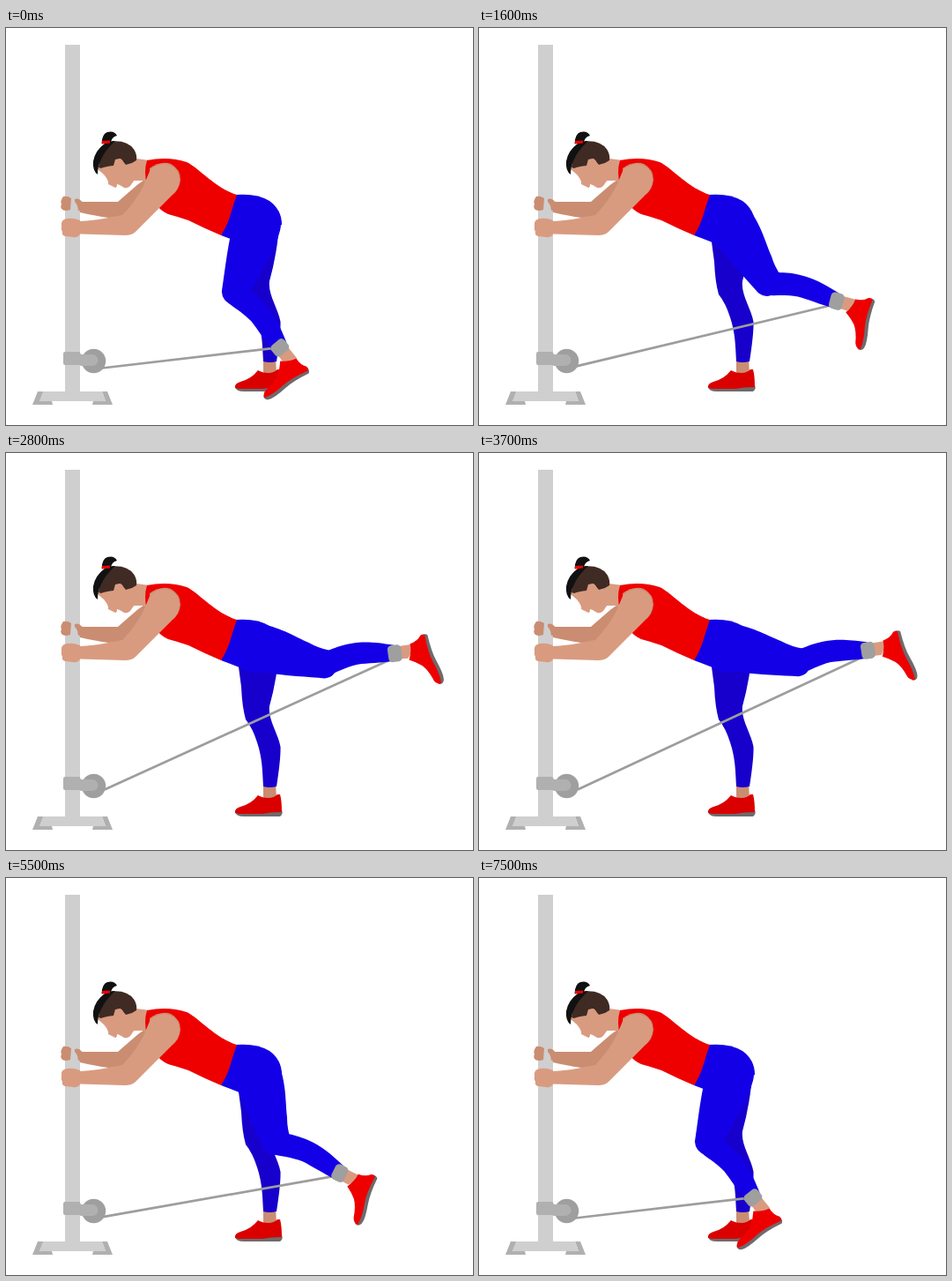
An HTML page for the animation above (7.6 s loop, 530x450 px).

```html
<!DOCTYPE html>
<html lang="en">
<head>
<meta charset="utf-8">
<title>Cable kickback</title>
<style>
  html, body { margin: 0; width: 100%; height: 100%; overflow: hidden; background: #fff; }
  svg { display: block; width: 530px; height: 450px; }
  .post { fill: #cfcfcf; }
  .steel { fill: #b0b0b0; }
  .grey { fill: #9f9f9f; }
  .skin { fill: #d99b80; }
  .shade { fill: #ca8d72; }
  .red { fill: #ee0000; }
  .dimred { fill: #da0000; }
  .blue { fill: #1400e6; }
  .dimblue { fill: #1700cc; }
  .sole { fill: #6e6a6c; }
  .hair { fill: #3f2b24; }
  .black { fill: #111; }
</style>
</head>
<body>
<svg viewBox="0 0 530 450">
  <!-- stand -->
  <path class="steel" d="M36 412H43L38 423H52L53 427H30ZM109 412H115L121 427H98L99 423H113Z"/>
  <path class="post" d="M67 19H84V412H109L113 423H38L42 412H67Z"/>
  <circle class="grey" cx="99.5" cy="377.5" r="13.7"/>
  <path class="steel" d="M67 367H83Q84 367 85 370H98A6.5 6.5 0 0 1 98 383H85L83 382H67Q65 382 65 380V369Q65 367 67 367Z"/>

  <!-- far arm -->
  <path class="shade" d="M160 170L150 177Q136 189 127 197L85 197Q82 203 84 209Q102 213 116 215L140 214L170 190Z"/>
  <path class="shade" d="M65 191Q70 190 74 193L73 206Q68 208 64 206Q61 203 63 200Q61 196 65 191ZM78 194Q83 192 87 198L86 206L82 207Q81 199 78 197Z"/>

  <!-- standing leg -->
  <path class="shade" d="M292 374H306L307 391L298 394L292 390Z"/>
  <path class="dimblue" d="M263 235L309 235Q306 262 299 287C297 302 309 318 311.500 333Q312 346 307 378Q299 380 292 378C291 360 291 346 285 328Q280 312 272 302Q268 288 267 265Z"/>
  <path class="sole" d="M260 407Q284 405 313 405Q315 409 311 412H270Q261 412 260 407Z"/>
  <path class="dimred" d="M260 408Q259 403 266 401Q278 398 286 388Q291 391 298 391Q304 391 308 387L311 387Q313 394 313 407Q300 407 291 409H265Z"/>

  <line id="cable" stroke="#9d9d9d" stroke-width="2.7"/>

  <!-- moving leg -->
  <g id="calf">
    <path class="skin" d="M-6 76H8V99H2L-7 92Z"/>
    <g id="shoe">
      <path class="sole" d="M21 -13Q26 -14 28 -11Q26 8 28 20Q31 37 29 43Q27 48 22 46Z"/>
      <path class="red" d="M6 -8Q15 -8 20 -13Q23 -14 25 -12Q22 8 24 20Q27 36 25 46Q20 46 18 40Q16 27 11 20Q6 14 -1 9Q5 1 6 -8Z"/>
    </g>
    <path class="blue" d="M14 2C16 10 18 18 18.500 30C19 46 16 58 10 78H-8C-8 60 -6 46 -6 34C-7 20 -12 9 -14 -3Q-4 -16 14 2Z"/>
    <rect class="grey" x="-9" y="70" width="19" height="15.5" rx="4.500"/>
  </g>
  <g id="thigh">
    <path class="blue" d="M29 0C29 26 22 42 19 58Q15 70 15 84Q13 92 0 94Q-13 96 -17 84C-19 65 -23 40 -24 17L-27 0A28 28 0 0 1 29 0Z"/>
  </g>
  <path class="blue" d="M260 189Q285 187 299 196Q313 206 313 223L270 245L244 235Z"/>

  <!-- torso and neck -->
  <path class="skin" d="M140 147L163 150L166 178L156 173L142 173Z"/>
  <path class="red" d="M160 150Q184 145 205 152C217 157 238 182 262 189Q258 200 254 214Q250 226 244 235Q225 227 207 218Q192 213 184 211Q177 208 172 202L160 178Q156 163 160 150Z"/>

  <!-- near arm -->
  <path class="shade" d="M163 159Q176 150 187 154Q198 160 198 172Q197 183 189 189L166 180Z"/>
  <path class="skin" d="M164 160Q177 151 187 156Q197 161 197 173Q196 182 188 190L147 231Q143 235 135 235L84 233.500V219Q100 218 111 216L132 212Q146 198 156 179Z"/>
  <path class="skin" d="M66 217Q74 214 84 218V234Q81 238 76 237L67 236Q63 235 64 231Q62 228 63 225Q62 219 66 217Z"/>

  <!-- head -->
  <path class="skin" d="M105 155L128 140L148 145V170Q144 174 141 179Q138 182 134 181L129 178L126 177Q126 181 124 181L116 177Q117 173 111 166L104 160Z"/>
  <path class="hair" d="M105 158Q106 142 120 128.500Q138 127 145.500 138Q149 144 148 150L143 153L136 155L130 148L124 149L122 156Q113 157 108 159Z"/>
  <path class="black" d="M104 166Q98 162 99 151Q101 139 112 131Q117 128 124 128Q112 139 108 149Q104 156 104 166Z"/>
  <path class="skin" d="M124 150Q130 146 133 151Q134 157 130 159Q126 158 124 150Z"/>
  <path class="black" d="M108.500 131Q109 120 115 118Q123 116 126 122Q120 123 118.500 131Z"/>
  <path class="red" d="M109 128L118 127.500L118 130.500L109 131.500Z"/>
</svg>
<script>
  const LOOP = 7600, STEP = 100;
  const HIP = [283, 222], THIGH = 83;

  // Monotone cubic curve through the given points
  function curve(xs, ys) {
    const last = xs.length - 1;
    const slope = i => (ys[i + 1] - ys[i]) / (xs[i + 1] - xs[i]);
    const tangent = xs.map((_, i) => {
      if (i === 0 || i === last) return 0;
      const a = slope(i - 1), b = slope(i);
      return a * b <= 0 ? 0 : 2 * a * b / (a + b);
    });
    return x => {
      let i = 0;
      while (i < last - 1 && x > xs[i + 1]) i++;
      const h = xs[i + 1] - xs[i];
      const s = Math.min(1, Math.max(0, (x - xs[i]) / h));
      const r = 1 - s;
      return r * r * (1 + 2 * s) * ys[i] + s * r * r * h * tangent[i]
        + s * s * (3 - 2 * s) * ys[i + 1] - s * s * r * h * tangent[i + 1];
    };
  }

  // Angles in degrees from straight down, positive backwards
  const thighAt = curve(
    [0, 800, 1600, 2400, 2800, 3300, 4000, 4400, 4800, 5500, 6300, 7200, 7600],
    [-15, -7.5, 35, 70, 78.5, 83, 75.5, 64, 48, 18, -5, -14, -15]);
  const bends = [-15, -5, 18, 35, 64, 78.5, 84];
  const calfAt = curve(bends, [39, 49, 64, 75, 88.5, 98, 101]);
  const footAt = curve(bends, [-58, -43, -20, -14, 11, 19, 22]);

  const [thigh, calf, shoe, cable] =
    ['thigh', 'calf', 'shoe', 'cable'].map(id => document.getElementById(id));

  // Point at (back, along) on a limb hanging from a joint
  function onLimb([x, y], deg, back, along) {
    const a = deg * Math.PI / 180, s = Math.sin(a), c = Math.cos(a);
    return [x + back * c + along * s, y - back * s + along * c];
  }

  function place(el, [x, y], deg) {
    el.setAttribute('transform', `translate(${x} ${y}) rotate(${-deg})`);
  }

  function draw(time) {
    const bend = thighAt(time), shin = calfAt(bend);
    const knee = onLimb(HIP, bend, 0, THIGH);
    const hook = onLimb(knee, shin, -5, 74);
    const lift = (bend + 15) / 95;
    place(thigh, HIP, bend);
    place(calf, knee, shin);
    place(shoe, [0, 92], footAt(bend) - shin);
    const ends = { x1: 109 + 3 * lift, y1: 385.5 - 4 * lift, x2: hook[0], y2: hook[1] };
    for (const k in ends) cable.setAttribute(k, ends[k]);
  }

  function tick() {
    const time = performance.now() % LOOP;
    draw(Math.floor(time / STEP) * STEP);
    requestAnimationFrame(tick);
  }
  tick();
</script>
</body>
</html>
```
